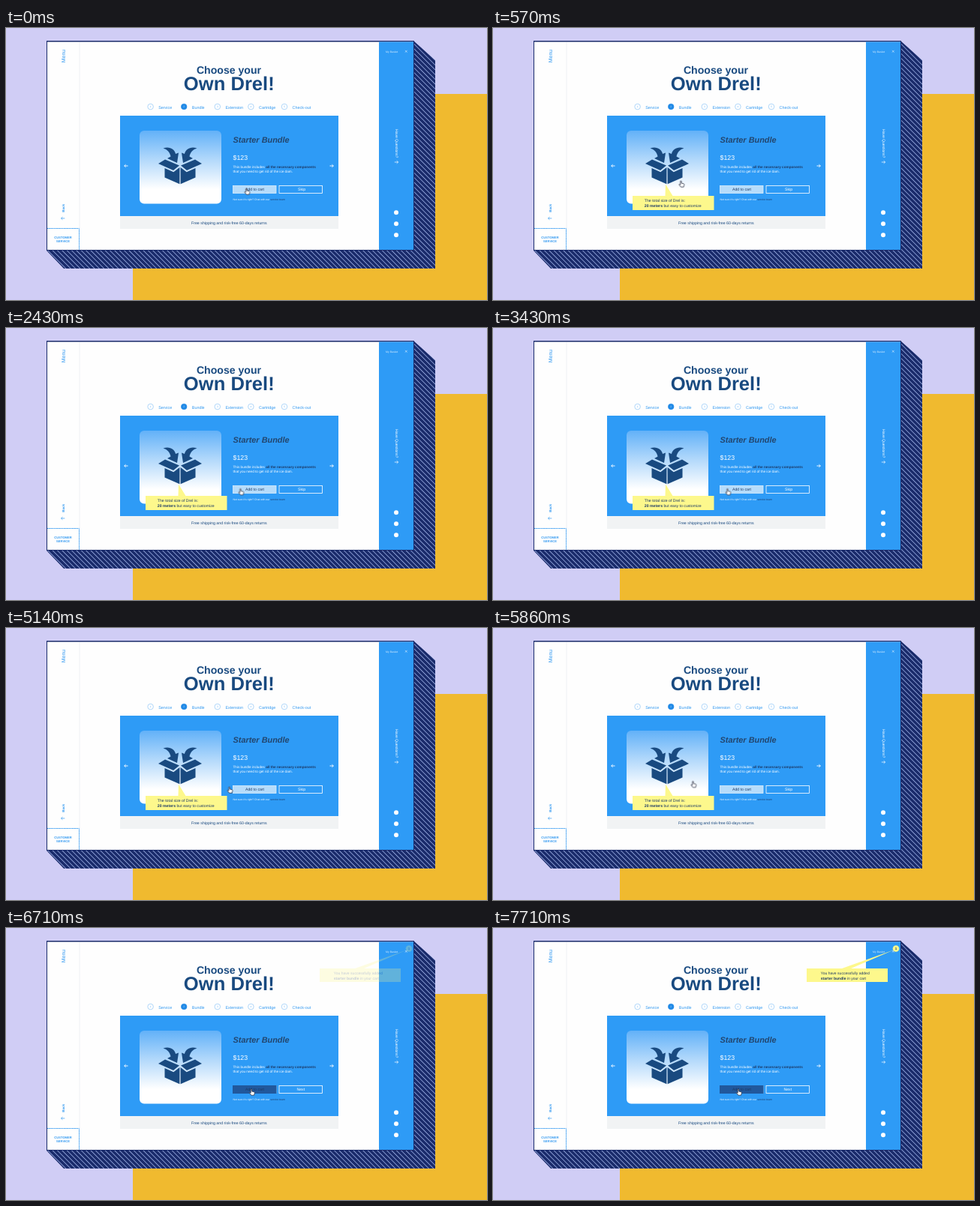
An HTML page for the animation above (8000 ms loop, 641 px wide and 363 px high).

```html
<!DOCTYPE html>
<html lang="en">
<head>
<meta charset="utf-8">
<title>Bundle shop</title>
<style>
  html, body { margin: 0; width: 100%; height: 100%; overflow: hidden; background: #d0cdf5; }
  svg { display: block; width: 100vw; height: 100vh; }
  text { font-family: "Liberation Sans", Arial, sans-serif; text-rendering: geometricPrecision; white-space: pre; }
  .b { font-weight: 700; }
  .mid { text-anchor: middle; }
  .navy { fill: #194a80; }
  .ink { fill: #1d3a66; }
  .blue { fill: #2f97f0; }
  .white { fill: #fff; }
  .s5 { font-size: 5.2px; }

  .cursor, .size-tip, .cart-tip, .before, .after { animation: 8s infinite both; }
  .cursor { animation-name: travel; }
  .size-tip { animation-name: size-tip; }
  .cart-tip { animation-name: cart-tip; }
  .before { animation-name: before; animation-timing-function: step-end; }
  .after { animation-name: after; animation-timing-function: step-end; }

  @keyframes travel {
    0% { transform: translate(321.5px, 218px); }
    1.75% { transform: translate(321.5px, 218px); animation-timing-function: steps(4, start); }
    8.85%, 21.4% { transform: translate(251.5px, 208px); animation-timing-function: steps(5, start); }
    30.3% { transform: translate(313.5px, 218.5px); animation-timing-function: linear; }
    64.2% { transform: translate(313.5px, 218.5px); animation-timing-function: steps(4, start); }
    71.3% { transform: translate(254px, 208.5px); animation-timing-function: step-end; }
    73.2% { transform: translate(267.5px, 208.5px); animation-timing-function: linear; }
    78.6% { transform: translate(267.5px, 208.5px); animation-timing-function: steps(3, start); }
    83.8%, 100% { transform: translate(328px, 219px); }
  }
  @keyframes size-tip {
    0% { opacity: 0; animation-timing-function: step-end; }
    5.35% { opacity: .5; animation-timing-function: step-end; }
    7.1% { opacity: 1; animation-timing-function: step-end; }
    75%, 100% { opacity: 0; }
  }
  @keyframes cart-tip {
    0% { opacity: 0; }
    83.8% { opacity: 0; animation-timing-function: steps(4, start); }
    90.9%, 100% { opacity: 1; }
  }
  @keyframes before { 0% { opacity: 1; } 83.8%, 100% { opacity: 0; } }
  @keyframes after { 0% { opacity: 0; } 83.8%, 100% { opacity: 1; } }
</style>
</head>
<body>
<svg viewBox="0 0 641 363" preserveAspectRatio="none">
  <defs>
    <pattern id="stripes" width="4.5" height="4.5" patternUnits="userSpaceOnUse" patternTransform="rotate(-45)">
      <rect width="4.5" height="4.5" fill="#1a2b6b"/>
      <rect width=".9" height="4.5" fill="#8c9fd6"/>
    </pattern>
    <linearGradient id="fade" x2="0" y2="1">
      <stop offset="0" stop-color="#62b1f8"/>
      <stop offset=".4" stop-color="#b3d9fb"/>
      <stop offset=".8" stop-color="#fff"/>
    </linearGradient>
    <path id="arrow" d="M-2.5 0H2.3M.4-1.8L2.3 0 .4 1.8" fill="none"/>
    <g id="half-box">
      <path d="M212 175.5L231 183.5 223 190 203 181Z"/>
      <path d="M211.5 187L223.3 192.3 231.4 186V208.3L211.5 199.5Z"/>
      <path d="M209.5 160.5C218 157.5 225 162 226 168L230 166.5 228 180 215 174 219.5 171.5C218.5 166 215 162 209.5 160.5Z"/>
    </g>
  </defs>

  <!-- Backdrop and window -->
  <rect width="641" height="363" fill="#d0cdf5"/>
  <rect x="169" y="88" width="472" height="275" fill="#f0ba2f"/>
  <path d="M543 17L572 43V321H77L54 297Z" fill="url(#stripes)"/>
  <rect x="54" y="17" width="490" height="280" fill="#1a2b6b"/>
  <rect x="55" y="18.5" width="488" height="277.5" fill="#fefefe"/>

  <!-- Left bar -->
  <path d="M98 19V267" stroke="#eceef3" stroke-width=".8"/>
  <g class="blue">
    <text class="mid" font-size="7" transform="translate(79 37.5) rotate(-90)">Menu</text>
    <text class="mid b" font-size="4.5" transform="translate(77.5 240.3) rotate(-90)">Back</text>
    <g class="mid b" font-size="4.1">
      <text x="76" y="281.3">CUSTOMER</text>
      <text x="76" y="286.3">SERVICE</text>
    </g>
  </g>
  <use href="#arrow" transform="translate(75.8 254) scale(-1 1)" stroke="#2f97f0" stroke-width=".7"/>
  <path d="M55 267.5H97.5V296" fill="none" stroke="#2f97f0" stroke-dasharray="1.5 .7"/>

  <!-- Right bar -->
  <rect x="497" y="18.5" width="46" height="277.5" fill="#2e9bf6"/>
  <g class="white">
    <text x="506" y="32.5" font-size="3.5" opacity=".8">My Basket</text>
    <text font-size="5" transform="translate(518.6 135) rotate(90)">Have Questions?</text>
    <circle cx="520" cy="246.3" r="3"/>
    <circle cx="520" cy="261.3" r="3"/>
    <circle cx="520" cy="276.3" r="3"/>
  </g>
  <path d="M532 29.8l2.6 2.8M534.6 29.8l-2.6 2.8" stroke="#cfe7fd" stroke-width=".7"/>
  <use href="#arrow" x="520.3" y="179" stroke="#fff" stroke-width=".7"/>

  <!-- Heading and steps -->
  <g class="mid b navy">
    <text x="297" y="61" font-size="14.1">Choose your</text>
    <text x="297.3" y="83.2" font-size="25.6">Own Drel!</text>
  </g>
  <g id="steps"></g>

  <!-- Product card -->
  <rect x="152" y="117" width="291" height="134" fill="#2e9bf6"/>
  <rect x="152" y="251" width="291" height="17" fill="#f1f3f4"/>
  <text class="mid navy" x="297.3" y="261.5" font-size="5.28">Free shipping and risk-free 60-days returns</text>
  <g stroke="#fff" stroke-width=".9">
    <use href="#arrow" transform="translate(160 184) scale(-1 1)"/>
    <use href="#arrow" x="434" y="184"/>
  </g>
  <rect x="178" y="137" width="109" height="97.5" rx="6" fill="url(#fade)"/>
  <g class="navy">
    <use href="#half-box"/>
    <use href="#half-box" transform="translate(464 0) scale(-1 1)"/>
  </g>
  <text class="b" x="302.5" y="153.3" font-size="10.9" font-style="italic" fill="#23466e">Starter Bundle</text>
  <g class="white">
    <text x="302.5" y="176" font-size="8.8">$123</text>
    <g font-size="4.66">
      <text x="302.5" y="186.8">This bundle includes <tspan class="b ink">all the necessary components</tspan></text>
      <text x="302.5" y="193">that you need to get rid of the ice dam.</text>
    </g>
    <text x="302.5" y="229.5" font-size="3.45">Not sure it's right? Chat with our <tspan class="ink">service team</tspan></text>
  </g>

  <!-- Buttons -->
  <g class="mid s5">
    <rect x="302.5" y="210.5" width="57.5" height="10" fill="#b6dcfb" stroke="#d9edfd" stroke-width=".8"/>
    <rect class="after" x="302" y="210" width="58.5" height="11" fill="#21589c"/>
    <text class="ink" x="331.5" y="217.4">Add to cart</text>
    <rect x="364" y="210.5" width="57.5" height="10" fill="none" stroke="#fff" stroke-width=".8"/>
    <g class="white">
      <text class="before" x="394" y="217.4">Skip</text>
      <text class="after" x="392.8" y="217.4">Next</text>
    </g>
  </g>

  <!-- Notes -->
  <g class="size-tip s5 ink">
    <path d="M186 224H229.5L230 208.5 239.5 224H294.5V243H186Z" fill="#fdf88c"/>
    <text x="201.8" y="232">The total size of Drel is:</text>
    <text x="201.8" y="239.2"><tspan class="b">20 meters</tspan> but easy to customize</text>
  </g>
  <g class="cart-tip ink" font-size="5.05">
    <path d="M418 54H465L533.5 29.5 477 54H526V72H418Z" fill="#fdf88c"/>
    <circle cx="537" cy="27.5" r="4.3" fill="#fdf88c"/>
    <text class="mid b" x="537" y="29.1" font-size="4.5">1</text>
    <text x="436.8" y="62">You have successfully added</text>
    <text x="436.8" y="68.8"><tspan class="b">starter bundle</tspan> in your cart</text>
  </g>

  <g class="cursor">
    <path d="M-1.8-3.6Q-1-4.6-.3-3.6V-.9L2.6-.2Q3.5.1 3.3 1.2L2.6 4.2H-1.2L-3.6 1Q-3.3.1-2.5.7L-1.8 1.3Z"
      fill="#fff" stroke="#23283c" stroke-width=".75" stroke-linejoin="round"/>
  </g>
</svg>
<script>
  const labels = ["Service", "Bundle", "Extension", "Cartridge", "Check-out"];
  document.getElementById("steps").innerHTML = labels.map((label, i) => {
    const x = 192.6 + i * 44.6, on = i === 1;
    return `<circle cx="${x}" cy="105" r="3.8" fill="${on ? "#2089e6" : "#fff"}" stroke="${on ? "#2089e6" : "#7dbcf5"}" stroke-width=".6"/>
      <text class="mid" x="${x}" y="106.2" font-size="3.3" fill="${on ? "#b9dcfb" : "#6db4f4"}">${i + 1}</text>
      <text class="blue" x="${x + 10.6}" y="107.5" font-size="5.4">${label}</text>`;
  }).join("");
</script>
</body>
</html>
```
